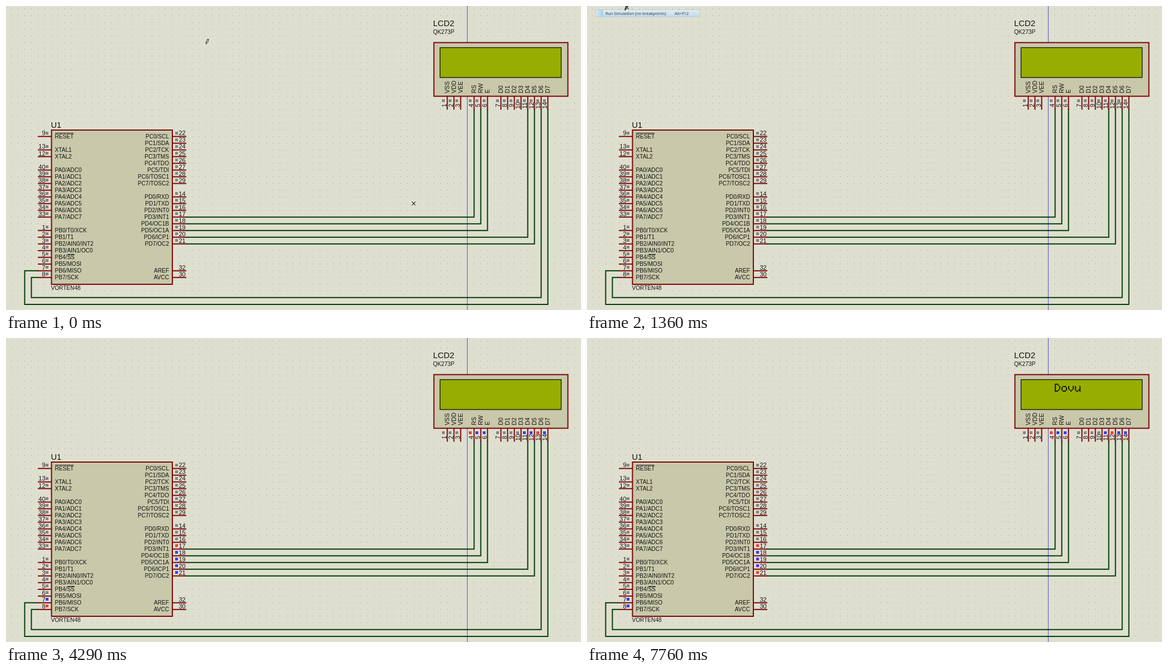
Animation of 1030 by 544 pixels, one loop 8 s. Source, as an HTML page with a canvas:

```html
<!DOCTYPE html>
<html lang="en">
<head>
<meta charset="utf-8">
<title>LCD simulation</title>
<style>
html, body { margin: 0; width: 100%; height: 100%; overflow: hidden; background: #dfdfd0; }
canvas { display: block; }
</style>
</head>
<body>
<canvas id="stage" width="1030" height="544"></canvas>
<script>
const ctx = document.getElementById('stage').getContext('2d');
const LOOP = 8000, G = 12.015;
const gx = n => 57.5 + n * G, gy = n => 233.5 + n * G;   // schematic grid
const SANS = '"Liberation Sans", Arial, sans-serif';
const MENU_FONT = '7.25px "Open Sans", "Noto Sans", sans-serif';
const PIN = '#7d0606', WIRE = '#003f05', BODY = '#c8c8aa';
const GREY = '#858585', RED = '#ff3a32', BLUE = '#3a3aff';

function text(str, x, y, size = 10.1, align = 'left') {
  ctx.font = `${size}px ${SANS}`;
  ctx.textAlign = align;
  ctx.fillStyle = '#141414';
  ctx.fillText(str, x, y + size * 0.36);
}
function upright(str, x, y, size, align) {
  ctx.save();
  ctx.translate(x, y);
  ctx.rotate(-Math.PI / 2);
  text(str, 0, 0, size, align);
  ctx.restore();
}
function line(color, width, ...points) {
  ctx.strokeStyle = color;
  ctx.lineWidth = width;
  ctx.beginPath();
  for (let i = 0; i < points.length; i += 2) ctx.lineTo(points[i], points[i + 1]);
  ctx.stroke();
}
function box(x, y, w, h, fill, stroke, width = 1) {
  ctx.fillStyle = fill;
  ctx.fillRect(x, y, w, h);
  if (!stroke) return;
  ctx.strokeStyle = stroke;
  ctx.lineWidth = width;
  ctx.strokeRect(x, y, w, h);
}
const led = (x, y, color) => box(Math.floor(x) - 2, Math.floor(y) - 2, 5, 5, color);

// Pins as [grid row, first number, number step, labels]
const leftPins = [
  [0, 9, 0, 'RESET'],
  [2, 13, -1, 'XTAL1 XTAL2'],
  [5, 40, -1, 'PA0/ADC0 PA1/ADC1 PA2/ADC2 PA3/ADC3 PA4/ADC4 PA5/ADC5 PA6/ADC6 PA7/ADC7'],
  [14, 1, 1, 'PB0/T0/XCK PB1/T1 PB2/AIN0/INT2 PB3/AIN1/OC0 PB4/SS PB5/MOSI PB6/MISO PB7/SCK']
];
const rightPins = [
  [0, 22, 1, 'PC0/SCL PC1/SDA PC2/TCK PC3/TMS PC4/TDO PC5/TDI PC6/TOSC1 PC7/TOSC2'],
  [9, 14, 1, 'PD0/RXD PD1/TXD PD2/INT0 PD3/INT1 PD4/OC1B PD5/OC1A PD6/ICP1 PD7/OC2'],
  [20, 32, -2, 'AREF AVCC']
];
const lcdPins = [
  [61, 1, 1, 'VSS VDD VEE'],
  [65, 4, 1, 'RS RW E'],
  [69, 7, 1, 'D0 D1 D2 D3 D4 D5 D6 D7']
];
function eachPin(groups, draw) {
  for (const [row, first, step, labels] of groups)
    labels.split(' ').forEach((label, i) => draw(row + i, first + i * step, label));
}

// Bus lines in the order RS RW E D4 D5 D6 D7
const chipBus = [17, 18, 19, 20, 21, 8, 7];
const lcdBus = [4, 5, 6, 11, 12, 13, 14];

function drawBoard(bus) {
  const level = (pins, pin) => {
    const i = pins.indexOf(pin);
    return !bus || i < 0 ? GREY : bus[i] ? RED : BLUE;
  };
  box(0, 0, 1030, 544, '#dfdfd0');
  ctx.fillStyle = '#96968c';
  for (let c = -4; c < 82; c++)
    for (let r = -19; r < 27; r++) ctx.fillRect(Math.floor(gx(c)), Math.floor(gy(r)), 1, 1);
  line('#4d4dc4', 1, 826.3, 0, 826.3, 544);

  [65, 66, 67, 73, 74].forEach((col, i) =>
    line(WIRE, 2, 322, gy(12 + i), gx(col), gy(12 + i), gx(col), 184));
  line(WIRE, 2, 58, gy(20), gx(-2), gy(20), gx(-2), gy(25), gx(76), gy(25), gx(76), 184);
  line(WIRE, 2, 58, gy(21), gx(-1), gy(21), gx(-1), gy(24), gx(75), gy(24), gx(75), 184);

  box(81.5, 222, 216.5, 276, BODY, PIN, 2);
  text('U1', 80.5, 212.5, 14.5);
  text('VORTEN48', 80.5, 504.5);
  eachPin(leftPins, (row, number, label) => {
    const y = gy(row);
    line(PIN, 2, 57, y, 81, y);
    text(number, 70.5, y - 6, 11, 'right');
    led(73, y - 6, level(chipBus, row < 14 ? 0 : number));
    text(label, 87.5, y);
  });
  eachPin(rightPins, (row, number, label) => {
    const y = gy(row);
    line(PIN, 2, 298, y, 323, y);
    text(number, 309.5, y - 6, 11);
    if (row < 20) led(305, y - 6, level(chipBus, number));
    text(label, 292, y, 10.1, 'right');
  });
  line('#141414', 1, 88, 227.5, 121, 227.5);
  line('#141414', 1, 110, 444.5, 123, 444.5);

  text('LCD2', 765, 31, 14.9);
  text('QK273P', 765, 46.5);
  box(766.5, 65.5, 240, 96, BODY, PIN, 2);
  box(777.5, 74.5, 217, 53.5, '#97ae00', '#101000', 1.3);
  eachPin(lcdPins, (col, number, label) => {
    const x = gx(col);
    line(PIN, 2, x, 162, x, 185.5);
    led(x - 6.5, 169, level(lcdBus, number));
    upright(number, x - 5.8, 178, 11, 'center');
    upright(label, x, 156, 10.6, 'left');
  });
}

// 5x7 dot glyphs, one number per row
const word = [
  [28, 18, 17, 17, 17, 18, 28],
  [0, 0, 14, 17, 17, 17, 14],
  [0, 0, 17, 17, 17, 10, 4],
  [0, 0, 17, 17, 17, 19, 13]
];
function drawWord(col) {
  const x0 = 789.6 + col * 12.07, y0 = 81.7 + (col % 2) * 24.2;
  ctx.fillStyle = '#101400';
  word.forEach((rows, i) => rows.forEach((bits, r) => {
    for (let c = 0; c < 5; c++)
      if (bits >> (4 - c) & 1) ctx.fillRect(x0 + i * 12.07 + c * 2, y0 + r * 2.05, 2, 2.05);
  }));
}

// Moments when the word moves on; some first show a blank screen with a command on the bus
const moves = [1670, 2000, 2330, 2660, 3000, 3340, 3680, 3950, 4290, 4560, 4890, 5230,
               6490, 6830, 7100, 7430, 7760];
const commands = { 3000: [0, 8], 3340: [0, 5], 3950: [0, 12], 4290: [1, 4], 6490: [0, 0], 6830: [1, 4] };
function lcdState(t) {
  const step = moves.filter(m => m <= t).length - 1;
  if (step < 0) return {};
  const command = t - moves[step] < 70 && commands[moves[step]];
  const [rs, nibble] = command || [1, 2];
  const bus = [rs, 0, 0, ...[0, 1, 2, 3].map(b => nibble >> b & 1)];
  return { bus, col: command ? -1 : step % 12 };
}

// Menu rows: [y, label, shortcut, disabled]
const menu = [
  [-1, 'Run Simulation', 'F12'],
  [13, 'Run Simulation (no breakpoints)', 'Alt+F12'],
  [27, 'Run Simulation (timed breakpoint)'],
  [45.3, 'Step Over Source Line', 'F10'],
  [59.5, 'Step Into Source Line', 'F11'],
  [73.7, 'Step Out from Source Line', 'Ctrl+F11'],
  [88, 'Run To Source Line', 'Ctrl+F10', 1],
  [102, 'Animated Single Step', 'Alt+F11'],
  [120.5, 'Reset Debug Popup Windows', '', 1],
  [134.6, 'Reset Persistent Model Data', '', 1],
  [149, 'Configure Diagnostics'],
  [163, 'Enable Remote Debug Monitor', '', 1],
  [181.6, 'Horz. Tile Popup Windows'],
  [196, 'Vertical Tile Popup Windows'],
  [214.5, '1. Simulation Log'],
  [228.6, '2. Watch Window'],
  [242.7, '3. MCU']
];
function menuRow([y, label, shortcut = '', disabled]) {
  ctx.font = MENU_FONT;
  ctx.textAlign = 'left';
  ctx.fillStyle = disabled ? '#acacac' : '#1c1c1c';
  ctx.fillText(label, 33, y + 2.7);
  ctx.fillText(shortcut, 157, y + 2.7);
}
function gradient(x, y, x2, y2, a, b) {
  const g = ctx.createLinearGradient(x, y, x2, y2);
  g.addColorStop(0, a);
  g.addColorStop(1, b);
  return g;
}
function highlight(y) {
  box(15.5, y - 6.5, 187, 13, gradient(0, y - 7, 0, y + 7, '#e2eef6', '#bdd8ea'), '#b2cfe2');
  box(16, y - 6, 13, 12, gradient(16, 0, 29, 0, '#d4e7f2', '#a5cbe2'));
}
function drawIcons() {
  for (const y of [-1, 45, 59, 73]) {
    line('#77706a', 1.2, 17, y + 3.5, 27, y + 3.5);
    line('#6b5140', 1.3, 17, y - 3, 21, y - 1, 24, y - 1, 26, y + 2);
    line('#b08a58', 1.5, 20, y + 1, 23, y + 1);
  }
  line('#a9b3ba', 1.2, 18, 84, 18, 92);
  line('#a9b3ba', 1.2, 20, 88, 26, 88, 24, 86);
  for (const d of [-2.5, 0, 2.5]) line('#30262a', .8, 17, 149 + d * 1.4, 21.5, 149 + d / 2, 26, 149 + d * 1.4);
  ctx.fillStyle = '#5b2624';
  ctx.beginPath();
  ctx.ellipse(21.5, 149, 2.3, 3.8, 0, 0, 7);
  ctx.fill();
  box(17.5, 177.5, 9, 8, '#fff', '#5d7894');
  box(17, 177, 10, 2, '#4186bd');
  line('#4186bd', 1.5, 17, 182, 27, 182);
  box(17.5, 191.5, 9, 8, '#fff', '#5d7894');
  line('#5d7894', 1.2, 22, 191, 22, 200);
}
function drawMenu(t) {
  ctx.globalAlpha = Math.min(1, .4 + (t - 600) / 150);
  box(17, 0, 191, 254, 'rgba(0,0,0,.13)');
  box(16, 0, 190.5, 252.5, 'rgba(0,0,0,.22)');
  box(14, -9.5, 190.5, 260.5, '#f3f3f4', '#8f9499');
  box(14.5, -9, 14, 259.5, gradient(15, 0, 29, 0, '#edf6fb', '#a9cfe4'));
  for (const y of [36.5, 111.5, 172.5, 205.5]) line('#c9ccd0', 1, 32, y, 197, y);
  if (t >= 880) highlight(t < 1080 ? -1 : 13);
  drawIcons();
  menu.forEach(menuRow);
  for (const y of [218.2, 232.3, 246.4]) line('#333', .7, 33, y, 37, y);
  ctx.fillStyle = '#111';
  ctx.beginPath();
  ctx.moveTo(195.5, 239);
  ctx.lineTo(198.5, 241.8);
  ctx.lineTo(195.5, 244.6);
  ctx.fill();
  ctx.globalAlpha = 1;
}

function cross(x, y) {
  line('#222', 1.1, x - 3.2, y - 3.2, x + 3.2, y + 3.2);
  line('#222', 1.1, x - 3.2, y + 3.2, x + 3.2, y - 3.2);
}
function pen(x, y) {
  ctx.beginPath();
  for (const [dx, dy] of [[-2, 5], [-1.8, 1], [.8, -4], [2.6, -3.2], [.6, 2]]) ctx.lineTo(x + dx, y + dy);
  ctx.closePath();
  ctx.fillStyle = '#f4f4ea';
  ctx.fill();
  ctx.strokeStyle = '#111';
  ctx.lineWidth = 1;
  ctx.stroke();
}

// Pointer path: [time, x, y]
const path = [[1360, 70, 3], [1430, 72, 5], [2120, 142, 44], [2330, 320, 139], [2660, 640, 255], [3000, 930, 352]];
function drawPointer(t) {
  if (t < 70) { pen(360.5, 63); cross(730.3, 353.4); return; }
  if (t < 1360) return cross(285.8, 17.5);
  if (t >= 3000) return t < 3750 && cross(1018 + Math.max(0, t - 3410) * .05, 378);
  const i = path.findIndex(p => p[0] > t);
  const [t0, x0, y0] = path[i - 1], [t1, x1, y1] = path[i];
  const f = (t - t0) / (t1 - t0), x = x0 + (x1 - x0) * f, y = y0 + (y1 - y0) * f;
  pen(x, y);
  cross(x + 1.5, y - .5);
}

function frame() {
  const t = performance.now() % LOOP;
  const { bus, col = -1 } = lcdState(t);
  drawBoard(bus);
  if (col >= 0) drawWord(col);
  if (t >= 600 && t < 1360) drawMenu(t);
  if (t >= 1360 && t < 1500) {
    ctx.globalAlpha = Math.min(.88, (1500 - t) / 140);
    highlight(13);
    menuRow(menu[1]);
    ctx.globalAlpha = 1;
  }
  drawPointer(t);
  requestAnimationFrame(frame);
}
requestAnimationFrame(frame);
</script>
</body>
</html>
```
